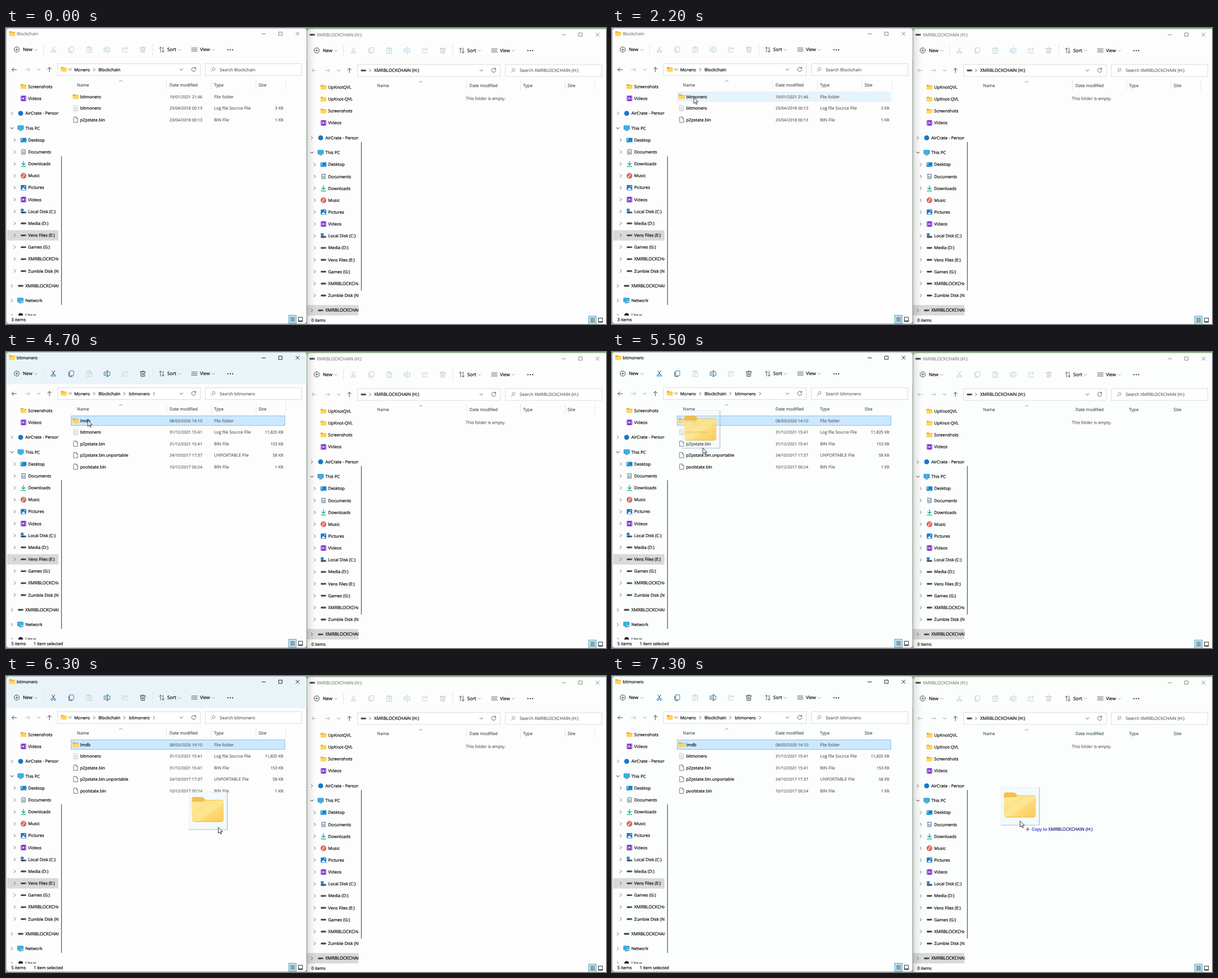
An HTML page for the animation above (8000 ms loop, 1064 by 526 pixels).

```html
<!DOCTYPE html>
<html lang="en">
<head>
<meta charset="utf-8">
<title>Copying a folder</title>
<style>
html, body { margin: 0; width: 100%; height: 100%; overflow: hidden; background: #fdfdfd; }
svg { display: block; width: 100vw; height: 100vh; }
text { font-family: "Open Sans", "Noto Sans", sans-serif; stroke-width: .2px; white-space: pre; text-rendering: geometricPrecision; }
.ln { fill: none; stroke-linecap: round; stroke-linejoin: round; }
</style>
</head>
<body>
<svg id="stage" viewBox="0 0 1064 526" preserveAspectRatio="none"></svg>
<script>
const GREY = '#686868', INK = '#080808';

// Drawing helpers: text is centred on y
const text = (x, y, s, { fill = INK, size = 7.55, end } = {}) =>
  `<text x="${x}" y="${y + 2.7}" fill="${fill}" stroke="${fill}" font-size="${size}" text-anchor="${end ? 'end' : 'start'}">${s}</text>`;
const rect = (x, y, w, h, fill, extra = '') =>
  `<rect x="${x}" y="${y}" width="${w}" height="${h}" fill="${fill}" ${extra}/>`;
const line = (d, color = '#555', w = .9) =>
  `<path class="ln" d="${d}" stroke="${color}" stroke-width="${w}"/>`;
const circle = (x, y, r, fill, extra = '') => `<circle cx="${x}" cy="${y}" r="${r}" fill="${fill}" ${extra}/>`;
const group = (x, y, s) => `<g transform="translate(${x} ${y})">${s}</g>`;
const named = (id, s) => `<g id="${id}">${s}</g>`;

const chevron = (x, y, dir = 'right', color = '#484848') => line({
  right: `M${x - 1.3} ${y - 2.6}l2.6 2.6-2.6 2.6`,
  down: `M${x - 2.5} ${y - 1.2}l2.5 2.5 2.5-2.5`,
  up: `M${x - 2.5} ${y + 1.2}l2.5-2.5 2.5 2.5`
}[dir], color);

// Small icons, each centred on 0,0
const monitor = rect(-5.3, -4.8, 10.6, 7.6, '#1a86c8', 'rx=".8"') + rect(-4.4, -4, 8.8, 6, '#35b4e6') + rect(-2.5, 3.4, 5, 1.3, '#3c6d86');
const drive = rect(-4.7, -1.4, 9.4, 3, '#3c3f42', 'rx=".8"') + rect(-4, -2, 8, 1, '#a9adb0') + rect(2, .2, 1.6, .8, '#63d08a');
const icons = {
  folder: '<path d="M-5.2-3.2q0-1 1-1h2.6l1.3 1.3h4.6q.9 0 .9.9v2h-10.4z" fill="#e8a31c"/>' + rect(-5.2, -2, 10.4, 6.3, '#ffd45c', 'rx=".8"'),
  videos: rect(-4.8, -4.8, 9.6, 9.6, '#7b35c9', 'rx="1.3"') + line('M-3.4-3.4v7M3.4-3.4v7', '#c9a5ee', 1) + '<path d="M-1.4-2.2L2 0l-3.4 2.2z" fill="#fff"/>',
  cloud: circle(0, 0, 4.4, '#1477cc'),
  pc: monitor,
  desktop: rect(-5.2, -4, 10.4, 8.2, '#1583c9', 'rx="1"') + rect(-4, -2.8, 2, 1.6, '#fff') + rect(-4, 0, 2, 1.6, '#bfe3fa') + rect(-1, 2.4, 5.4, 1, '#71c3ef'),
  documents: rect(-4, -4.8, 8, 9.6, '#8ba0b5', 'rx=".8"') + rect(-2.6, -3.2, 5.2, 2.6, '#e7eef5') + line('M-2.4 1h4.8M-2.4 2.8h4.8', '#e7eef5', .8),
  downloads: line('M0-4.5v6.5M-3-.7l3 2.9 3-2.9M-4 4.6h8', '#12a37c', 1.3),
  music: circle(0, 0, 5, '#d5604c') + line('M-.8 2v-4.4l2.6-.7v3.8', '#fff', .8) + circle(-1.6, 2.1, 1.1, '#fff'),
  pictures: rect(-4.8, -4.8, 9.6, 9.6, '#1a78c8', 'rx="1.2"') + '<path d="M-4 4l4-4.4L4 4z" fill="#fff"/>' + circle(2.2, -2.2, 1, '#fff'),
  local: group(0, 1.6, drive) + rect(-4.8, -4.8, 5, 4.4, '#1683d0'),
  drive,
  network: group(-.5, 0, monitor) + circle(2.6, 2, 2.7, '#63b8df') + line('M0 2h5', '#e6f6ff', .6),
  tux: circle(0, 0, 4.2, '#222'),
  log: '<path d="M-3.6-4.7h5l2.2 2.2v7.2h-7.2z" fill="#fff" stroke="#b3b3b3" stroke-width=".8"/>' + line('M-1.8-1.4h3.4M-1.8.6h3.4M-1.8 2.6h3.4', '#b0b0b0', .7),
  file: '<path d="M-3.6-4.7h4.6l2.6 2.6v6.8h-7.2z" fill="#fff" stroke="#666" stroke-width=".9"/>' + line('M1-4.7v2.6h2.6', '#666', .8)
};
const icon = (name, x, y) => group(x, y, icons[name]);

// Toolbar: on = the commands for a selected entry
function commands(on) {
  const a = on ? '#2b2b2b' : '#b9cbd9', b = on ? '#1177bd' : '#a5cde9', pale = '#a5cde9', soft = '#c3cdd5';
  const cut = line('M-2.6-5L2 2.2M2.6-5L-2 2.2', a) + circle(-2.6, 3.4, 1.6, 'none', `stroke="${b}"`) + circle(2.6, 3.4, 1.6, 'none', `stroke="${b}"`);
  const copy = line('M-1.8-5h5.2q1 0 1 1v6.4q0 1-1 1h-5.2q-1 0-1-1V-4q0-1 1-1z', b) + line('M-4.3-3v6.6q0 1.6 1.6 1.6h4.4', a);
  const paste = line('M-2-3.8h-2.2v9h3M2-3.8h2.2V-1', soft) + line('M-1.8-5h3.6v2h-3.6zM0-.6h4.6v5.8H0z', pale);
  const rename = line('M-1-3h-4.2v6H-1M2.4-3h2.8v6H2.4', b) + line('M.8-5v10M-.4-5h2.4M-.4 5h2.4', a) + line('M-3.4 1.4l1.2-3 1.2 3', b, .7);
  const share = line('M-1-3.6h-3.4v8h8V2', soft) + line('M-2 1q.6-3.6 4-3.6h2.4M2.4-4.8l2.4 2.2-2.4 2.2', pale);
  const bin = line('M-4.8-3.4h9.6M-1.4-3.6q0-1.6 1.4-1.6t1.4 1.6M-3.8-3.2l.8 8h6l.8-8M-1-1v3.6M1-1v3.6', on ? '#2b2b2b' : '#b8b8b8');
  return [cut, copy, paste, rename, share, bin].map((s, i) => group(84 + 31.7 * i, 38.5, s)).join('');
}

const rule = d => `<g class="rule">${line(d, '#e0e0e0', .8)}</g>`;

const toolbar =
  circle(19, 38.3, 4.6, 'none', 'stroke="#333" stroke-width=".9"') + line('M16.8 38.3h4.4M19 36.1v4.4', '#333', .8) +
  text(30, 38.7, 'New', { size: 8.1 }) + chevron(53, 38.8, 'down', '#999') +
  line('M274 43v-9M271.8 36.2L274 34l2.2 2.2M278.6 34v9M276.4 40.8l2.2 2.2 2.2-2.2', '#333', .8) +
  text(286, 38.7, 'Sort', { size: 8.2 }) + chevron(307.5, 38.8, 'down', '#999') +
  line('M329 35.6h10M329 38.4h10M329 41.2h10', '#333', .8) +
  text(344, 38.7, 'View', { size: 8.1 }) + chevron(367.5, 38.8, 'down', '#999') +
  [393.5, 397.7, 401.9].map(x => circle(x, 38.8, 1.05, INK)).join('') + rule('M66.5 28v20M260.5 28v20');

const buttons = color => line('M453.8 10.5h6.4', color) + line('M484 7.3h5.8v5.8H484z', color) + line('M514 7.2l6 6M520 7.2l-6 6', color);

// Address row, column headings, status icons; wide = extra width of the date column
function chrome(backColor, wide) {
  const cols = [[126, 'Name'], [290, 'Date modified'], [369 + wide, 'Type'], [448 + wide, 'Size']];
  const edges = [284.5, 364.5 + wide, 443.5 + wide, 496.5 + wide];
  return line('M10.5 74h8M13.6 70.8L10.4 74l3.2 3.2', backColor) + line('M34 74h8M38.8 70.8L42 74l-3.2 3.2', '#b0b0b0') +
    chevron(58, 74, 'down', '#888') + line('M77 78v-8M73.8 73.2L77 70l3.2 3.2', '#333') +
    rect(91.5, 63.5, 253, 21, '#fff', 'stroke="#dcdcdc"') + rect(353.5, 63.5, 171, 21, '#fff', 'stroke="#dcdcdc"') +
    chevron(311, 74, 'down') + line('M336 71.4a3.7 3.7 0 1 0 .7 2.6M336.4 69.6v2.2h-2.2', '#555') +
    circle(368.2, 72.8, 2.5, 'none', 'stroke="#777" stroke-width=".8"') + line('M366.3 74.8l-2.6 2.6', '#777', .8) +
    chevron(203.5, 94, 'up', '#777') + cols.map(c => text(c[0], 101, c[1], { fill: '#4d5a66' })).join('') +
    rule(edges.map(x => `M${x} 92v17`).join('')) +
    rect(501.5, 510.5, 13, 14, '#cdebf7', 'stroke="#37a4c9"') + line('M504.5 514.2h7.4M504.5 516.5h7.4M504.5 518.8h7.4M504.5 521h7.4', '#333', .9) +
    rect(518.6, 514, 7.2, 6.4, '#fff', 'stroke="#333"') + line('M518.8 521.2h6.8', '#333', 1.5);
}

// Navigation tree
const drives = [['Desktop', 'desktop'], ['Documents', 'documents'], ['Downloads', 'downloads'], ['Music', 'music'],
  ['Pictures', 'pictures'], ['Videos', 'videos'], ['Local Disk (C:)', 'local'], ['Media (D:)', 'drive'],
  ['Vens Files (E:)', 'drive'], ['Games (G:)', 'drive'], ['XMRBLOCKCHAIN (H:)', 'drive'], ['Zumble Disk (N:)', 'drive']];
const STEP = 21.15;
function tree(top, links, rest, pick) {
  const entry = (y, [name, pic], deep, arrow) => {
    const x = deep ? 31 : 26;
    return (arrow ? chevron(deep ? 15.5 : 10.5, y, arrow, arrow === 'down' ? INK : '#555') : '') + icon(pic, x, y) +
      text(x + 8.3, y, name, { size: name.startsWith('XMR') ? 7.85 : 7.6 });
  };
  let y = top, out = rect(2, pick - 9.3, 91, 18.6, '#d9d9d9', 'rx="1.5"');
  links.forEach(l => { out += entry(y, l, true); y += STEP; });
  y += 5.4;
  out += entry(y, ['AirCrate - Personal', 'cloud'], false, 'right');
  y += 26.3;
  out += entry(y, ['This PC', 'pc'], false, 'down');
  drives.forEach(d => { y += STEP; out += entry(y, d, true, 'right'); });
  rest.forEach(r => { y += 26.3; out += entry(y, r, false, 'right'); });
  return `<g clip-path="url(#nav)">${out}</g>`;
}
const shots = ['Screenshots', 'folder'], vids = ['Videos', 'videos'], stick = ['XMRBLOCKCHAIN (H:)', 'drive'];

const fileRows = list => list.map(([name, pic, date, type, size], i) => {
  const y = 122 + 20.45 * i;
  return icon(pic, 123.5, y) + text(131.5, y, name) + text(290, y, date, { fill: GREY, size: 7.15 }) +
    text(369, y, type, { fill: GREY }) + text(492, y, size, { fill: GREY, size: 7.15, end: true });
}).join('');
const LOG = 'Log file Source File';
const outer = [['bitmonero', 'folder', '19/01/2021 21:46', 'File folder', ''],
  ['bitmonero', 'log', '23/04/2018 00:13', LOG, '3 KB'], ['p2pstate.bin', 'file', '23/04/2018 00:13', 'BIN File', '1 KB']];
const inner = [['lmdb', 'folder', '08/03/2020 14:10', 'File folder', ''],
  ['bitmonero', 'log', '31/12/2021 15:41', LOG, '11,825 KB'], ['p2pstate.bin', 'file', '31/12/2021 15:41', 'BIN File', '153 KB'],
  ['p2pstate.bin.unportable', 'file', '24/10/2017 17:37', 'UNPORTABLE File', '58 KB'], ['poolstate.bin', 'file', '10/12/2017 00:24', 'BIN File', '1 KB']];

const rightWindow = group(532, 1.5,
  rect(2, .5, 534, 526, '#fdfdfd', 'class="sheet" rx="5"') +
  icon('drive', 11, 10.5) + text(19, 10.3, 'XMRBLOCKCHAIN (H:)', { size: 7.85, fill: '#858585' }) + buttons('#777') +
  toolbar + commands(false) + chrome('#b0b0b0', 16) +
  icon('drive', 102, 74) + chevron(113.5, 74) + text(121, 74, 'XMRBLOCKCHAIN (H:)', { size: 7.85 }) +
  text(379, 74, 'Search XMRBLOCKCHAIN (H:)', { size: 7.7, fill: GREY }) +
  text(283.5, 124, 'This folder is empty.', { fill: GREY, size: 7.5 }) +
  rect(2, 0, 91, 18.6, '#cce8ff', 'id="target"') +
  tree(103.7, [['UpKnotQVL', 'folder'], ['UpKnot-QVL', 'folder'], shots, vids], [stick], 500) +
  rect(97.6, 201, 1.3, 264, '#5c5c5c') + text(9.5, 517.6, '0 items', { size: 7.4 }));

const leftWindow =
  rect(.5, .5, 532.5, 525, '#fdfdfd', 'class="sheet" rx="5" stroke="#a9b0b0" stroke-width=".8"') +
  '<path id="bar" d="M1 57V6q0-5 5-5h522q5 0 5 5v51z"/>' +
  icon('folder', 11, 10) +
  named('titleA', text(19, 10.3, 'Blockchain', { fill: '#858585', size: 7.7 })) +
  named('titleB', text(19, 10.3, 'Blockchain', { size: 7.7 })) + named('titleC', text(19, 10.3, 'bitmonero')) +
  named('dim', buttons('#777')) + named('lit', buttons('#111')) +
  toolbar + named('cmdOff', commands(false)) + named('cmdOn', commands(true)) + chrome('#333', 0) +
  icon('folder', 102.5, 73.5) + line('M113 71.8l-1.8 1.8 1.8 1.8M116 71.8l-1.8 1.8 1.8 1.8', '#444', .8) +
  text(121, 74, 'Monero', { size: 7.6 }) + chevron(156.5, 74) + text(164, 74, 'Blockchain', { size: 7.75 }) +
  named('crumb', chevron(210, 74) + text(218, 74, 'bitmonero')) + named('crumbEnd', chevron(262.5, 74)) +
  named('findA', text(379, 74, 'Search Blockchain', { fill: GREY })) + named('findB', text(379, 74, 'Search bitmonero', { fill: GREY })) +
  rect(115, 113, 380, 18, '#e5f3fd', 'id="hover"') +
  rect(115.5, 113.5, 379, 17, '#cce8ff', 'id="picked" stroke="#8cc3ec"') +
  named('outer', fileRows(outer)) + named('inner', fileRows(inner)) +
  tree(104, [shots, vids], [stick, ['Network', 'network'], ['Linux', 'tux']], 368.5) +
  rect(97.8, 228, 1.3, 264, '#5c5c5c') +
  named('count3', text(9.5, 518, '3 items', { size: 7.5 })) + named('count5', text(9.5, 518, '5 items', { size: 7.5 })) +
  named('one', text(49, 518, '1 item selected', { size: 7.4 }));

const bigFolder =
  rect(.5, .5, 68, 67, '#dfeefa', 'opacity=".3"') + line('M.5 67.5V.5h68', '#e4edf3', .8) + line('M.5 67.5h68V.5', '#9db9cf', 1.2) +
  '<path d="M5.5 13q0-3.5 3.5-3.5h14q2 0 3.4 1.6l3 3.4h29q3.6 0 3.6 3.6V30H5.5z" fill="#f4bb3c"/>' +
  '<path d="M5.5 21q0-3 3-3h16q2 0 3.6-1.4t3.4-1.4h27q3.5 0 3.5 3.5V50q0 3.6-3.6 3.6H9q-3.5 0-3.5-3.6z" fill="url(#gold)"/>' +
  '<path d="M5.5 45L48 15.2h10.5q3.5 0 3.5 3.5V21L17 53.6H9q-3.5 0-3.5-3.6z" fill="#fff3b0" opacity=".3"/>' +
  line('M9 53.4h49.5', '#e2a93a', .9);

const stage = document.getElementById('stage');
stage.innerHTML =
  `<defs><clipPath id="nav"><rect x="0" y="92" width="93" height="419"/></clipPath>
  <linearGradient id="gold" x1="0" y1="0" x2="1" y2="1"><stop offset="0" stop-color="#ffeb9b"/><stop offset="1" stop-color="#fbc94f"/></linearGradient>
  <linearGradient id="shade"><stop offset="0" stop-color="#000" stop-opacity=".17"/><stop offset=".35" stop-color="#000" stop-opacity=".07"/><stop offset="1" stop-color="#000" stop-opacity="0"/></linearGradient></defs>` +
  rect(0, 0, 1064, 526, '#9db594') + rightWindow + rect(533, 2, 16, 524, 'url(#shade)') + leftWindow +
  named('drag', bigFolder) +
  named('move', line('M-4 0h8M1-2.8L4 0 1 2.8', '#333')) +
  named('copy', line('M10.5 14.5h6M13.5 11.5v6', '#333') +
    text(20.5, 14.5, 'Copy to <tspan fill="#15157c" stroke="#15157c">XMRBLOCKCHAIN (H:)</tspan>', { size: 7.75, fill: '#2b35c4' })) +
  named('mouse', '<path d="M0 0v10.6l2.5-2.3 1.7 3.8 1.7-.8-1.7-3.6h3.4z" fill="#fff" stroke="#222" stroke-width=".9" stroke-linejoin="round"/>');

const el = {};
stage.querySelectorAll('[id]').forEach(e => el[e.id] = e);
const sheets = [...stage.querySelectorAll('.sheet')], rules = [...stage.querySelectorAll('.rule')];
const show = (id, on) => el[id].setAttribute('display', on ? 'inline' : 'none');
const place = (id, x, y) => el[id].setAttribute('transform', `translate(${x} ${y})`);

// Keys: time, x, y
const pointer = [[1200, 1040, 508], [2000, 107, 93], [2200, 145, 123.5], [4200, 145, 123.5], [4300, 145, 122.5], [4400, 145, 122.5],
  [4500, 145, 121.5], [5200, 145, 121.5], [5300, 148, 132], [5500, 161, 170.5], [6300, 376.5, 268.8], [6600, 587, 286.8], [6700, 587, 286.8], [7300, 723.7, 257.8]];
const ghost = [[5300, 114, 68], [5500, 123, 103.5], [6300, 324, 205.5], [6600, 518.3, 226.5], [6700, 518.3, 226.5], [7300, 689.5, 197.5]];
function along(keys, t) {
  const i = keys.findIndex(k => k[0] > t);
  if (i === 0) return keys[0].slice(1);
  if (i < 0) return keys[keys.length - 1].slice(1);
  const [a, b] = [keys[i - 1], keys[i]], u = (t - a[0]) / (b[0] - a[0]);
  return [a[1] + (b[1] - a[1]) * u, a[2] + (b[2] - a[2]) * u];
}

function draw(ms) {
  const t = Math.floor(ms / 100) * 100;
  const active = t >= 2800, inside = t >= 3100, loaded = t >= 3400;
  const selected = (active && !loaded) || t >= 4700;
  const bright = (t >= 5300 && t < 6200) || t >= 6400;
  const [x, y] = along(pointer, t);

  show('titleA', !active); show('titleB', active && !inside); show('titleC', inside);
  show('dim', !active); show('lit', active);
  show('cmdOff', !selected); show('cmdOn', selected);
  show('crumb', inside); show('crumbEnd', t >= 3600);
  show('findA', !inside); show('findB', inside);
  show('outer', !inside); show('inner', loaded);
  show('count3', !inside); show('count5', inside);
  show('hover', t >= 2200 && !selected && (!inside || loaded));
  show('picked', selected && (!inside || loaded));
  show('one', selected && (!inside || loaded));
  el.bar.setAttribute('fill', !active ? '#fdfdfd' : bright ? '#fafefd' : '#eaf4f8');
  sheets.forEach(s => s.setAttribute('fill', bright ? '#fcfefd' : '#fdfdfd'));
  rules.forEach(r => r.setAttribute('display', bright ? 'none' : 'inline'));

  show('mouse', t >= 1200);
  place('mouse', x, y);
  const dragging = t >= 5300;
  show('drag', dragging);
  place('drag', ...along(ghost, t));
  el.drag.setAttribute('opacity', Math.min(.92, .7 + (t - 5300) / 1000));

  const overNav = dragging && x > 535 && x < 624;
  show('target', overNav); show('move', overNav);
  if (overNav) el.target.setAttribute('y', 241.2 + STEP * Math.round((y - 242.7) / STEP) - 9.3);
  place('move', x - 22, y + 14.5);
  show('copy', dragging && x > 632);
  place('copy', x, y);
}

function tick(now) {
  draw(now % 8000);
  requestAnimationFrame(tick);
}
draw(0);
requestAnimationFrame(tick);
</script>
</body>
</html>
```
